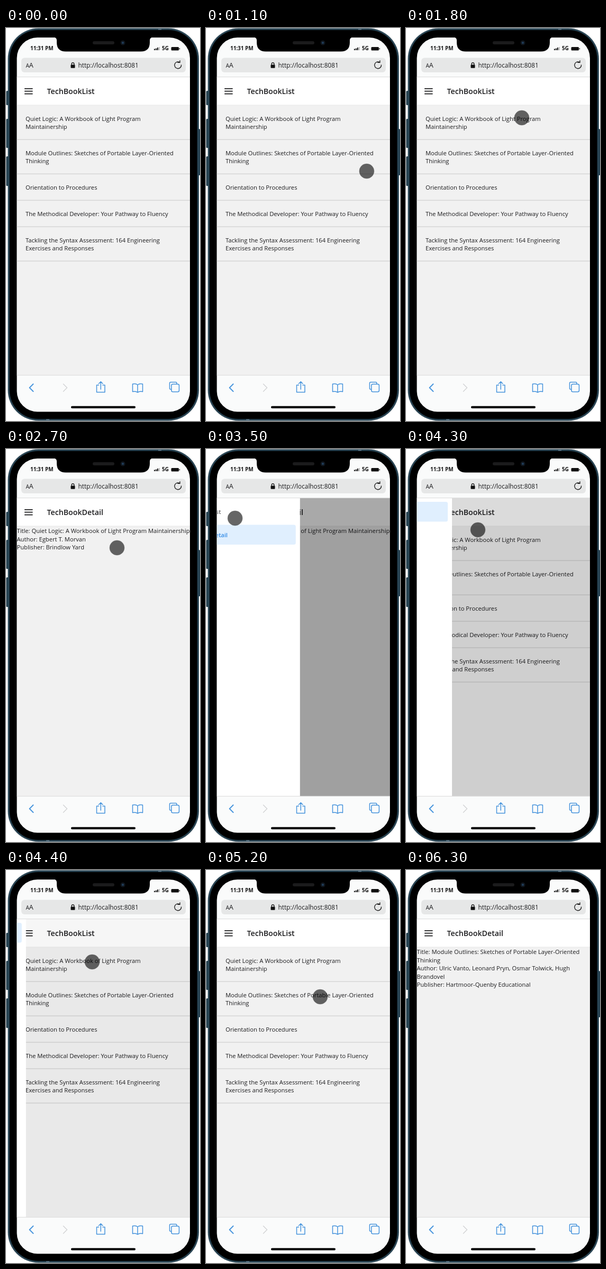
Animation, 367 px wide and 744 px high, one loop 7 s. Source, as an HTML page:

```html
<!DOCTYPE html>
<html lang="en">
<head>
<meta charset="utf-8">
<title>TechBookList</title>
<style>
  html, body { margin: 0; width: 100%; height: 100%; overflow: hidden; background: #fff; }
  svg { display: block; width: 367px; height: 744px; }
  text { font: 11.2px "Open Sans", "Noto Sans", sans-serif; fill: #1c1c1e; white-space: pre; }
  .title { font-size: 14.2px; font-weight: 600; }
  .status { font-size: 9.9px; font-weight: 700; fill: #111; }
  .item { font-weight: 600; font-size: 11px; fill: #68686a; }
  .item.on { fill: #2f8ae6; }
  .icon { fill: none; stroke: #4593dc; stroke-width: 1.5; stroke-linecap: round; stroke-linejoin: round; }
</style>
</head>
<body>
<svg viewBox="0 0 367 744">
  <defs>
    <clipPath id="screen"><rect x="20.5" y="18" width="327.5" height="708.5" rx="39"/></clipPath>
    <clipPath id="view"><rect x="20.5" y="93" width="327.5" height="564"/></clipPath>
  </defs>

  <!-- phone body -->
  <g fill="#24404f">
    <rect x="0.5" y="119" width="5" height="27" rx="1.5"/>
    <rect x="0.5" y="172" width="5" height="55" rx="1.5"/>
    <rect x="0.5" y="243" width="5" height="56" rx="1.5"/>
    <rect x="362" y="191" width="5" height="88" rx="1.5"/>
  </g>
  <rect x="3.5" y="0.5" width="361.5" height="743" rx="58" fill="#1d3543"/>
  <rect x="4.7" y="1.7" width="359.1" height="740.6" rx="57" fill="none" stroke="#3d5c6c"/>
  <path d="M288 2h6M76 742h6" stroke="#587080" stroke-width="3"/>
  <rect x="7" y="4" width="354.5" height="736" rx="54" fill="#000"/>

  <g clip-path="url(#screen)">
    <rect x="20" y="18" width="329" height="709" fill="#fafbfb"/>

    <!-- app -->
    <g clip-path="url(#view)">
      <rect x="20" y="93" width="329" height="53" fill="#fff"/>
      <rect x="20" y="146" width="329" height="512" fill="#f1f1f1"/>
      <path d="M20 146h329" stroke="#e4e4e4" stroke-width=".8"/>
      <path d="M35 114.8h15.5M35 119.7h15.5M35 124.6h15.5" stroke="#1c1c1e" stroke-width="1.8"/>
      <text id="heading" class="title" x="77.5" y="125"></text>
      <g id="list"></g>
      <g id="details"></g>
      <rect id="shade" x="20" y="93" width="329" height="565"/>
      <g id="drawer">
        <rect x="-20" y="93" width="275" height="565" fill="#fff"/>
        <rect id="active" x="29" width="218" height="37.5" rx="3.5" fill="#e0effe"/>
        <text id="toList" class="item" x="35.5" y="122.8">TechBookList</text>
        <text id="toDetail" class="item" x="35.5" y="166.8">TechBookDetail</text>
      </g>
      <circle id="touch" r="14.3" fill="#000" fill-opacity=".6" stroke="#fff" stroke-opacity=".25" stroke-width=".8"/>
    </g>

    <!-- browser bars -->
    <path d="M20 92.7h329M20 657.3h329" stroke="#d9d9d9"/>
    <rect x="29" y="56.5" width="311" height="27.5" rx="6" fill="#e6e7e7"/>
    <text x="37.5" y="75" style="font-size:10px">A</text>
    <text x="43.5" y="75" style="font-size:13px">A</text>
    <rect x="122.5" y="69.5" width="8" height="6.2" rx="1" fill="#111"/>
    <path d="M124.2 70v-2a2.3 2.3 0 0 1 4.6 0v2" fill="none" stroke="#111" stroke-width="1.3"/>
    <text x="136.5" y="75" style="font-size:11.8px">http://localhost:8081</text>
    <path d="M331.6 69.5a6.4 6.4 0 1 1-3-4.6M324.4 65.4h4.6v-4.2" fill="none" stroke="#222" stroke-width="1.4"/>

    <!-- status bar -->
    <text class="status" x="46" y="41.6">11:31 PM</text>
    <text class="status" x="295" y="41.6">5G</text>
    <path d="M281 42v-2.5M284 42v-3.5M287 42v-5" stroke="#111" stroke-width="2"/>
    <path d="M290 42v-6" stroke="#bbb" stroke-width="2"/>
    <rect x="312.5" y="36" width="14.5" height="6.5" rx="1.5" fill="#111"/>
    <rect x="327.8" y="38" width="1.2" height="2.5" fill="#111"/>

    <!-- toolbar -->
    <g class="icon">
      <path d="M51.5 674l-7 7 7 7" stroke-width="1.9"/>
      <path d="M108.5 674l7 7-7 7" stroke="#d3d4d5"/>
      <path d="M175.5 676h-4v13.5h15.5V676h-4M179.3 684v-14M175.5 673.3l3.8-3.8 3.8 3.8"/>
      <path d="M249 675.5c-2.5-2-6.5-2.4-9.5-1.5v14.5c3-.9 7-.5 9.5 1.5c2.5-2 6.5-2.4 9.5-1.5V674c-3-.9-7-.5-9.5 1.5V690"/>
      <rect x="313" y="674.3" width="14.5" height="14.5" rx="2.5"/>
      <path d="M312.5 684h-1a2 2 0 0 1-2-2v-9.5a2 2 0 0 1 2-2h9.5a2 2 0 0 1 2 2v1.5"/>
    </g>
    <rect x="123" y="715.7" width="122" height="4.3" rx="2.1" fill="#000"/>
  </g>

  <!-- notch -->
  <path d="M90 17.5q6 .5 6 6v4q0 17 17 17h142q17 0 17-17v-4q0-5.5 6-6z" fill="#000"/>
  <rect x="164" y="25" width="41" height="6" rx="3" fill="#1b1b1c"/>
  <circle cx="221" cy="28" r="4.5" fill="#10161d"/>
  <circle cx="221" cy="28" r="2" fill="#22405e"/>
</svg>
<script>
const LOOP = 7000, STEP = 100, PITCH = 15.5;
const $ = id => document.getElementById(id);

const books = [
  ["Quiet Logic: A Workbook of Light Program", "Maintainership"],
  ["Module Outlines: Sketches of Portable Layer-Oriented", "Thinking"],
  ["Orientation to Procedures"],
  ["The Methodical Developer: Your Pathway to Fluency"],
  ["Tackling the Syntax Assessment: 164 Engineering", "Exercises and Responses"],
];
const bookDetails = [
  ["Title: " + books[0].join(" "), "Author: Egbert T. Morvan", "Publisher: Brindlow Yard"],
  ["Title: " + books[1][0], books[1][1],
   "Author: Ulric Vanto, Leonard Pryn, Osmar Tolwick, Hugh", "Brandovel",
   "Publisher: Hartmoor-Quenby Educational"],
];

const lines = (rows, x, y) =>
  rows.map((row, i) => `<text x="${x}" y="${y + i * PITCH}">${row}</text>`).join("");

let rowY = 146;
$("list").innerHTML = books.map(rows => {
  const y = rowY;
  rowY += rows.length * 15 + 35;
  return lines(rows, 37, y + 29.8) +
    `<path d="M20 ${rowY + 0.3}h329" stroke="#d6d6d6" stroke-width="1.4"/>`;
}).join("");
$("details").innerHTML = bookDetails.map(rows => `<g>${lines(rows, 20.5, 159)}</g>`).join("");

// touch path: time, x, y
const path = [
  [900, 362, 330], [1300, 246, 212], [1400, 246, 212], [1800, 219, 170], [1900, 219, 170],
  [2100, 222, 174], [2300, 222, 174], [2700, 210, 187], [3100, 50, 125], [3200, 43, 121],
  [3300, 43, 121], [3500, 55, 131], [3900, 102, 138], [4100, 98, 124], [4200, 109, 132],
  [4400, 163, 174], [4700, 208, 226], [4800, 208, 226], [5200, 216, 240], [5500, 216, 240],
  [6300, 364, 330],
];
function touchAt(t) {
  const i = path.findIndex(p => p[0] > t);
  if (i < 1) return null;
  const [t0, x0, y0] = path[i - 1], [t1, x1, y1] = path[i];
  const k = (t - t0) / (t1 - t0);
  return [x0 + (x1 - x0) * k, y0 + (y1 - y0) * k];
}

const easeOut = (t, start) => 1 - (1 - Math.min(1, Math.max(0, (t - start) / 420))) ** 3;
const show = (el, on) => el.setAttribute("visibility", on ? "visible" : "hidden");

function draw(t) {
  const detail = t >= 5600 ? 1 : t >= 2400 && t < 4200 ? 0 : -1;
  const onList = detail < 0;
  $("heading").textContent = onList ? "TechBookList" : "TechBookDetail";
  show($("list"), onList);
  [...$("details").children].forEach((g, i) => show(g, i === detail));

  const open = easeOut(t, 3370) - easeOut(t, 4156);
  $("shade").setAttribute("opacity", open / 2);
  $("drawer").setAttribute("transform", `translate(${(open - 1) * 234.5})`);
  show($("drawer"), open > 0);
  $("active").setAttribute("y", onList ? 100 : 143.5);
  $("toList").classList.toggle("on", onList);
  $("toDetail").classList.toggle("on", !onList);

  const at = touchAt(t);
  show($("touch"), at && t >= 1000);
  if (at) $("touch").setAttribute("transform", `translate(${at})`);
}

function tick(now) {
  draw(Math.floor((now % LOOP) / STEP) * STEP);
  requestAnimationFrame(tick);
}
requestAnimationFrame(tick);
</script>
</body>
</html>
```
